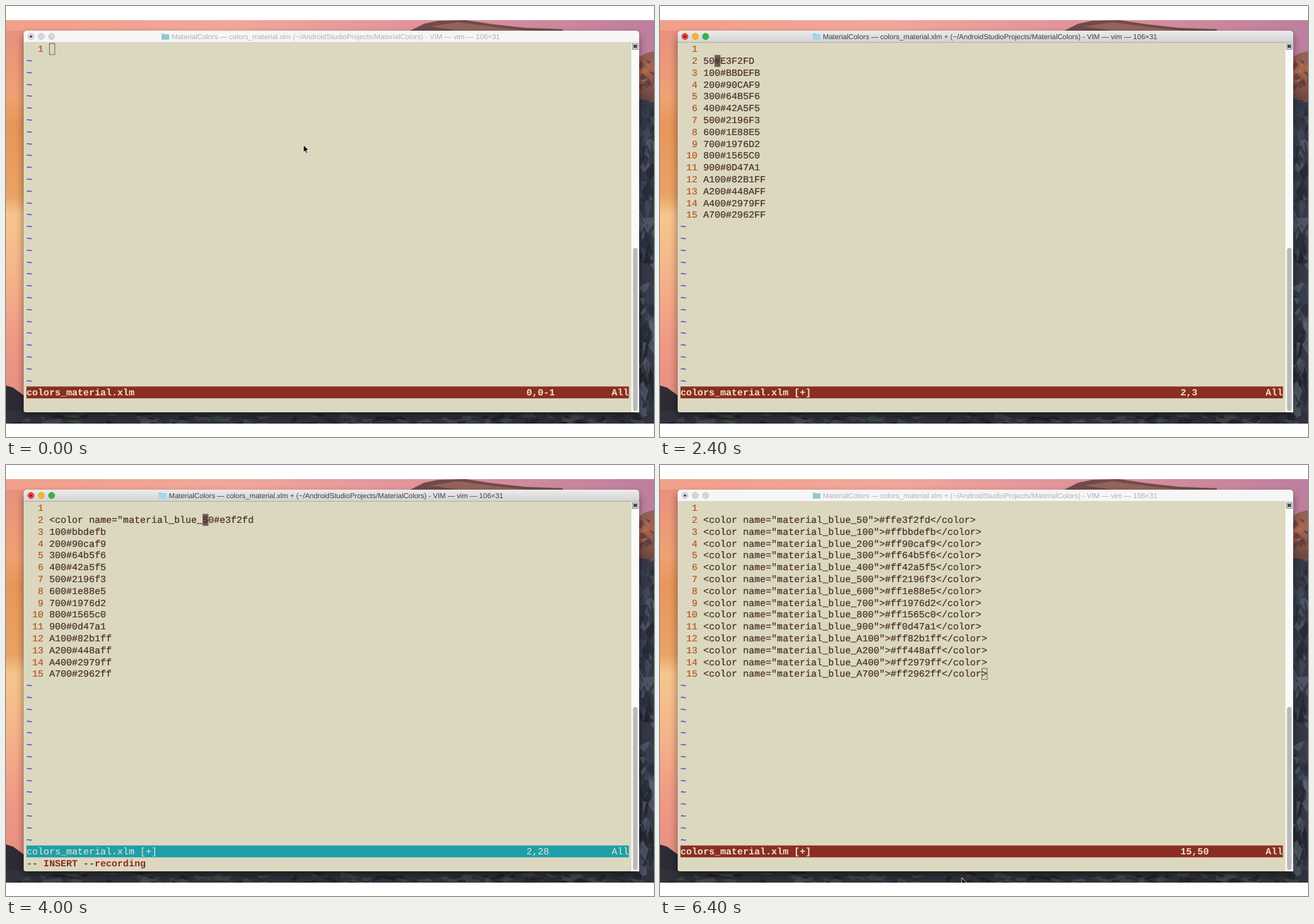
These frames come from a looping animation (917 by 611 pixels, 7200 ms). An HTML page:

```html
<!DOCTYPE html>
<html lang="en">
<head>
<meta charset="utf-8">
<title>Vim macro</title>
<style>
html, body { margin: 0; width: 100%; height: 100%; overflow: hidden; background: #fff; }
svg { display: block; width: 917px; height: 611px; }
text { white-space: pre; text-rendering: geometricPrecision; }
.mono { font: 13.4px "Liberation Mono", "Courier New", monospace; }
.bold { font-weight: bold; }
.code { fill: #4a2e28; stroke: #4a2e28; stroke-width: .22px; }
.num { fill: #b5571f; stroke: #b5571f; stroke-width: .2px; }
.tilde { fill: #3c22cf; stroke: #3c22cf; stroke-width: .2px; }
.title { font: 10.16px "Liberation Sans", Arial, sans-serif; }
</style>
</head>
<body>
<svg viewBox="0 0 917 611">
  <defs>
    <linearGradient id="left" x2="0" y2="1">
      <stop offset="0" stop-color="#e9907f"/>
      <stop offset=".17" stop-color="#f0a173"/>
      <stop offset=".24" stop-color="#e8965a"/>
      <stop offset=".42" stop-color="#eaa365"/>
      <stop offset=".47" stop-color="#f6c68e"/>
      <stop offset=".62" stop-color="#f5b489"/>
      <stop offset=".78" stop-color="#f09a86"/>
      <stop offset="1" stop-color="#e58a80"/>
    </linearGradient>
    <linearGradient id="sky">
      <stop offset="0" stop-color="#f0a08a"/>
      <stop offset=".35" stop-color="#f2a79b"/>
      <stop offset=".65" stop-color="#e0929a"/>
      <stop offset="1" stop-color="#bd7f9f"/>
    </linearGradient>
    <linearGradient id="cliff" x2="0" y2="1">
      <stop offset="0" stop-color="#8d6058"/>
      <stop offset=".4" stop-color="#a4644e"/>
      <stop offset="1" stop-color="#6a4543"/>
    </linearGradient>
    <linearGradient id="bar" x2="0" y2="1">
      <stop offset="0" stop-color="#ececec"/>
      <stop offset="1" stop-color="#d2d2d2"/>
    </linearGradient>
    <filter id="blur" x="-10%" y="-10%" width="120%" height="120%">
      <feGaussianBlur stdDeviation="6"/>
    </filter>
    <clipPath id="photo"><rect y="20" width="917" height="572"/></clipPath>
  </defs>
  <g clip-path="url(#photo)">
    <rect y="20" width="917" height="572" fill="url(#sky)"/>
    <rect y="35" width="30" height="557" fill="url(#left)"/>
    <path d="M570 36L592 25L612 21L650 20L690 26L735 31L788 33V36Z" fill="#6f4b4b"/>
    <path d="M600 29L640 23L700 31L740 35H640Z" fill="#94635a"/>
    <path d="M890 76L905 67L917 64V134H890Z" fill="url(#cliff)"/>
    <path d="M890 131L917 135V592H890Z" fill="#343945"/>
    <path d="M0 538L10 541L25 552V592H0Z" fill="#2d2b33"/>
    <rect y="574" width="917" height="18" fill="#30323c"/>
    <g id="rocks"></g>
    <rect x="25" y="41" width="871" height="540" rx="5" opacity=".45" filter="url(#blur)"/>
    <g id="window"></g>
  </g>
</svg>
<script>
const COL = 8.04, ROW = 16.8, LEFT = 29, TOP = 61;
const STEP = 800, LOOP = 7200;
const RED = '#8a2d22', TEAL = '#1f9fa7';
const $ = id => document.getElementById(id);

const shades = ('50#E3F2FD 100#BBDEFB 200#90CAF9 300#64B5F6 400#42A5F5 500#2196F3 600#1E88E5 ' +
  '700#1976D2 800#1565C0 900#0D47A1 A100#82B1FF A200#448AFF A400#2979FF A700#2962FF').split(' ');
const lower = shades.map(s => s.replace(/#.*/, hex => hex.toLowerCase()));
const tag = '<color name="material_blue_';
const xml = lower.map(s => tag + s.replace('#', '">#ff') + '</color>');
const partial = [tag + lower[0], ...lower.slice(1)];

// Buffer lines, cursor [line, column], and window or mode details
const edited = { lines: ['', ...xml], cur: [15, 50] };
const states = [
  { lines: [''], cur: [1, 1], pos: '0,0-1', idle: true, clean: true, arrow: [421, 197] },
  { lines: ['', ''], cur: [2, 1], insert: true, msg: '-- INSERT --' },
  { lines: ['', ...shades], cur: [4, 10] },
  { lines: ['', ...shades], cur: [2, 3] },
  { lines: ['', ...lower], cur: [2, 3], msg: '14 lines changed' },
  { lines: ['', ...partial], cur: [2, 28], insert: true, msg: '-- INSERT --recording' },
  { ...edited, beam: [422, 213] },
  { ...edited, arrow: [427, 585] },
  { ...edited, idle: true, arrow: [427, 585] }
];

const esc = s => s.replace(/&/g, '&amp;').replace(/</g, '&lt;');
const rect = (x, y, w, h, fill, more = '') =>
  `<rect x="${x}" y="${y}" width="${w}" height="${h}" fill="${fill}" ${more}/>`;
const path = (d, fill, more = '') => `<path d="${d}" fill="${fill}" ${more}/>`;
const cell = (col, row, s, cls, more = '') =>
  `<text class="mono ${cls}" x="${LEFT + col * COL}" y="${TOP + row * ROW + 4.2}" ${more}>${esc(s)}</text>`;

function titleBar(s) {
  const x = s.clean ? 220 : 216;
  const name = `MaterialColors — colors_material.xlm${s.clean ? '' : ' +'} ` +
    '(~/AndroidStudioProjects/MaterialColors) - VIM — vim — 106×31';
  const lights = s.idle ? ['#d6d6d6', '#d6d6d6', '#d6d6d6'] : ['#f0443c', '#f9b42c', '#35b544'];
  const rims = s.idle ? ['#bdbdbd', '#bdbdbd', '#bdbdbd'] : ['#d8372f', '#dd9a22', '#259a34'];
  return path('M25 52V40Q25 35 30 35H891Q896 35 896 40V52Z', s.idle ? '#f6f6f6' : 'url(#bar)') +
    rect(25, 51, 871, 1, s.idle ? '#d4d4d4' : '#b0b0b0') +
    lights.map((c, i) =>
      `<circle cx="${35.3 + i * 14.6}" cy="43.2" r="4.4" fill="${c}" stroke="${rims[i]}" stroke-width=".7"/>`).join('') +
    `<circle cx="35.3" cy="43.2" r="1.5" fill="${s.idle ? '#333' : '#6d0a08'}"/>` +
    path(`M${x} 39h4l1 1h6v7.5h-11z`, s.idle ? '#a5d3d8' : '#91cfe2') +
    rect(x, 41, 11, 6.5, s.idle ? '#92c8cd' : '#a4d9e8') +
    `<text class="title" x="${x + 14.5}" y="46.7" fill="${s.idle ? '#b0b0b0' : '#3e3e3e'}">${name}</text>`;
}

function scrollBar() {
  return rect(885, 52, 11, 524, '#fafafa') +
    rect(887.3, 343, 6.4, 231, '#b9b9b9', 'rx="3.2"') +
    rect(886.5, 53.5, 8, 8, '#e4e4e4', 'stroke="#777" stroke-width=".8"') +
    rect(888, 55, 5, 4.5, '#444');
}

function buffer(s) {
  const [line, col] = s.cur;
  const x = LEFT + (col + 3) * COL, y = TOP + (line - 1.5) * ROW;
  let out = s.idle
    ? rect(x + .4, y + .5, COL - .6, ROW - 1, 'none', 'stroke="#796b5b"')
    : rect(x, y, COL + .2, ROW, '#6d5c51');
  for (let i = 0; i < 29; i++) {
    out += i < s.lines.length
      ? cell(0, i, String(i + 1).padStart(3), 'num') + cell(4, i, s.lines[i], 'code')
      : cell(0, i, '~', 'tilde');
  }
  return out;
}

function statusLine(s) {
  const cls = s.insert ? '' : 'bold';
  const put = (col, str) => cell(col, 29, str, cls, `fill="${s.insert ? '#e6ead8' : '#eee3c6'}"`);
  return rect(LEFT, 539.4, 852.5, 16.8, s.insert ? TEAL : RED) +
    put(0, 'colors_material.xlm' + (s.clean ? '' : ' [+]')) +
    put(88, s.pos || s.cur.join()) + put(103, 'All') +
    (s.msg ? cell(0, 30, s.msg, s.insert ? 'bold' : 'code', s.insert ? `fill="${RED}"` : '') : '');
}

function pointer({ arrow, beam }) {
  if (arrow) {
    return path(`M${arrow}v10.5l2.4-2.2 1.7 3.8 1.8-.8-1.7-3.7h3.3z`, '#000', 'stroke="#fff" stroke-width=".8"');
  }
  if (beam) {
    const [x, y] = beam;
    return path(`M${x - 2.5} ${y - 5.5}q2.5 0 2.5 2v7.5q0 2-2.5 2M${x + 2.5} ${y - 5.5}q-2.5 0-2.5 2` +
      `v7.5q0 2 2.5 2M${x - 1.5} ${y + 2}h3`, 'none', 'stroke="#333" stroke-width=".9"');
  }
  return '';
}

function render(s) {
  $('window').innerHTML = titleBar(s) +
    path('M25 52H896V573Q896 576 893 576H28Q25 576 25 573Z', '#dcd8c0') +
    scrollBar() + buffer(s) + statusLine(s) + pointer(s);
}

// Seeded facets give the mountains some texture
function rocks() {
  let seed = 7;
  const rnd = () => (seed = seed * 16807 % 2147483647) / 2147483647;
  const pick = list => list[Math.floor(rnd() * list.length)];
  const shard = (x, y, w, h, tones) =>
    path(`M${x} ${y}l${w * rnd()} ${h * rnd()}l${-w * rnd()} ${h * rnd()}l${-w * rnd()} ${-h * rnd()}z`,
      pick(tones), 'opacity=".7"');
  const slate = ['#1f232c', '#272c38', '#454c5b', '#596070', '#3b4352'];
  let out = '';
  for (let i = 0; i < 100; i++) out += shard(894 + rnd() * 23, 142 + rnd() * 440, 11, 22, slate);
  for (let i = 0; i < 120; i++) out += shard(rnd() * 917, 577 + rnd() * 13, 18, 6, ['#1d1e25', '#282a33', '#4c4b55', '#454f45']);
  for (let i = 0; i < 16; i++) out += shard(897 + rnd() * 20, 76 + rnd() * 46, 10, 10, ['#754a43', '#b87458', '#5b3c3e']);
  return out;
}

$('rocks').innerHTML = rocks();
let shown = -1;
const start = performance.now();
function tick() {
  const i = Math.floor((performance.now() - start) % LOOP / STEP);
  if (i !== shown) render(states[shown = i]);
  requestAnimationFrame(tick);
}
tick();
</script>
</body>
</html>
```
